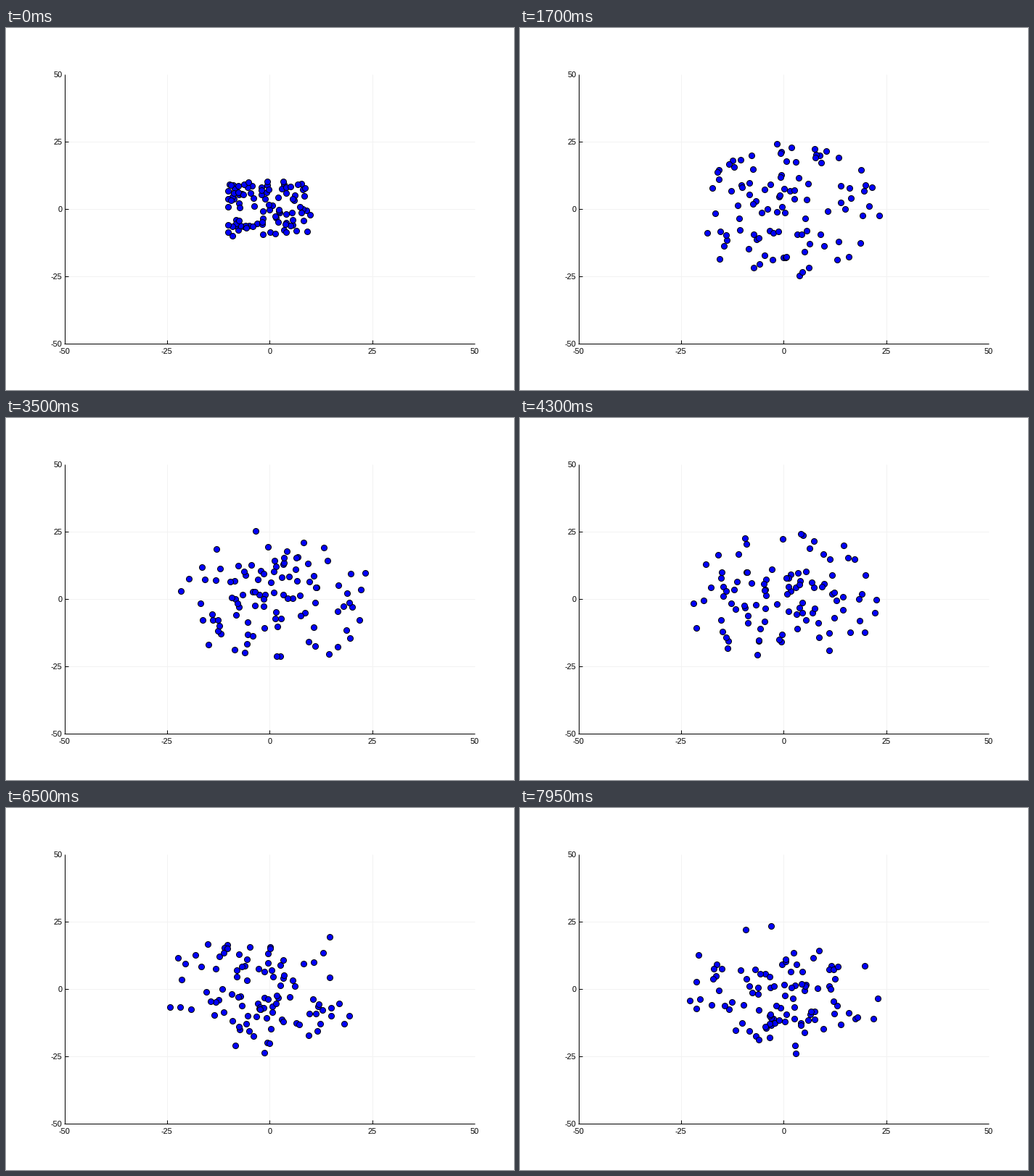
Write a matplotlib script that moves like this. It is 700 px wide and 500 px high and loops after 8000 ms.

```python
import numpy as np
import matplotlib.pyplot as plt
from matplotlib.animation import FuncAnimation

W, H, DPI = 700, 500, 100
PX = 72 / DPI                      # one pixel in points
FRAMES, STEP_MS = 160, 50
COUNT, SUBSTEPS = 100, 4
LEFT, RIGHT, TOP, BOTTOM = 80.5, 646, 64, 435.5
WALL, STIFF, SPEED = 22.3, 0.11, 0.4


def to_x(v):
    return LEFT + (v + 50) * (RIGHT - LEFT) / 100


def to_y(v):
    return BOTTOM - (v + 50) * (BOTTOM - TOP) / 100


def simulate():
    """Particles leave a square and bounce inside a soft round wall."""
    rng = np.random.default_rng(12)
    pos = rng.uniform(-10.2, 10.2, (COUNT, 2))
    vel = np.clip(rng.normal(0, SPEED, (COUNT, 2)), -0.95, 0.95)
    path = np.empty((FRAMES, COUNT, 2))
    for k in range(FRAMES):
        path[k, :, 0] = to_x(pos[:, 0])
        path[k, :, 1] = to_y(pos[:, 1])
        for _ in range(SUBSTEPS):
            r = np.hypot(pos[:, 0], pos[:, 1])
            push = np.maximum(r - WALL, 0) / np.maximum(r, 1e-9)
            vel -= STIFF * push[:, None] * pos / SUBSTEPS
            pos += vel / SUBSTEPS
    return path


plt.rcParams["font.family"] = "Liberation Sans"
fig = plt.figure(figsize=(W / DPI, H / DPI), dpi=DPI, facecolor="white")
ax = fig.add_axes([0, 0, 1, 1])
ax.set_xlim(0, W)
ax.set_ylim(H, 0)
ax.axis("off")


def line(x, y, color="black", z=2):
    ax.plot(x, y, color=color, lw=PX, zorder=z, solid_capstyle="butt")


for v in (-25, 0, 25):
    x, y = to_x(v), to_y(v)
    line([x, x], [TOP, BOTTOM], "#f2f2f2", 1)
    line([LEFT, RIGHT], [y, y], "#f2f2f2", 1)
    line([x, x], [BOTTOM, BOTTOM - 5])
    line([LEFT, LEFT + 5], [y, y])
line([LEFT, LEFT], [TOP, BOTTOM + 0.5])
line([LEFT - 0.5, RIGHT], [BOTTOM, BOTTOM])

for v in (-50, -25, 0, 25, 50):
    ax.text(to_x(v), 450, str(v), size=11 * PX, ha="center", va="baseline")
    ax.text(77.5, to_y(v) + 4, str(v), size=11 * PX, ha="right", va="baseline")

path = simulate()
dots = ax.scatter(path[0, :, 0], path[0, :, 1], s=(8 * PX) ** 2, c="#0000ff",
                  edgecolors="black", linewidths=PX, zorder=3)


def draw(k):
    dots.set_offsets(path[k])
    return (dots,)


anim = FuncAnimation(fig, draw, frames=FRAMES, interval=STEP_MS,
                     repeat=True, repeat_delay=0, blit=False)
plt.show()
```
